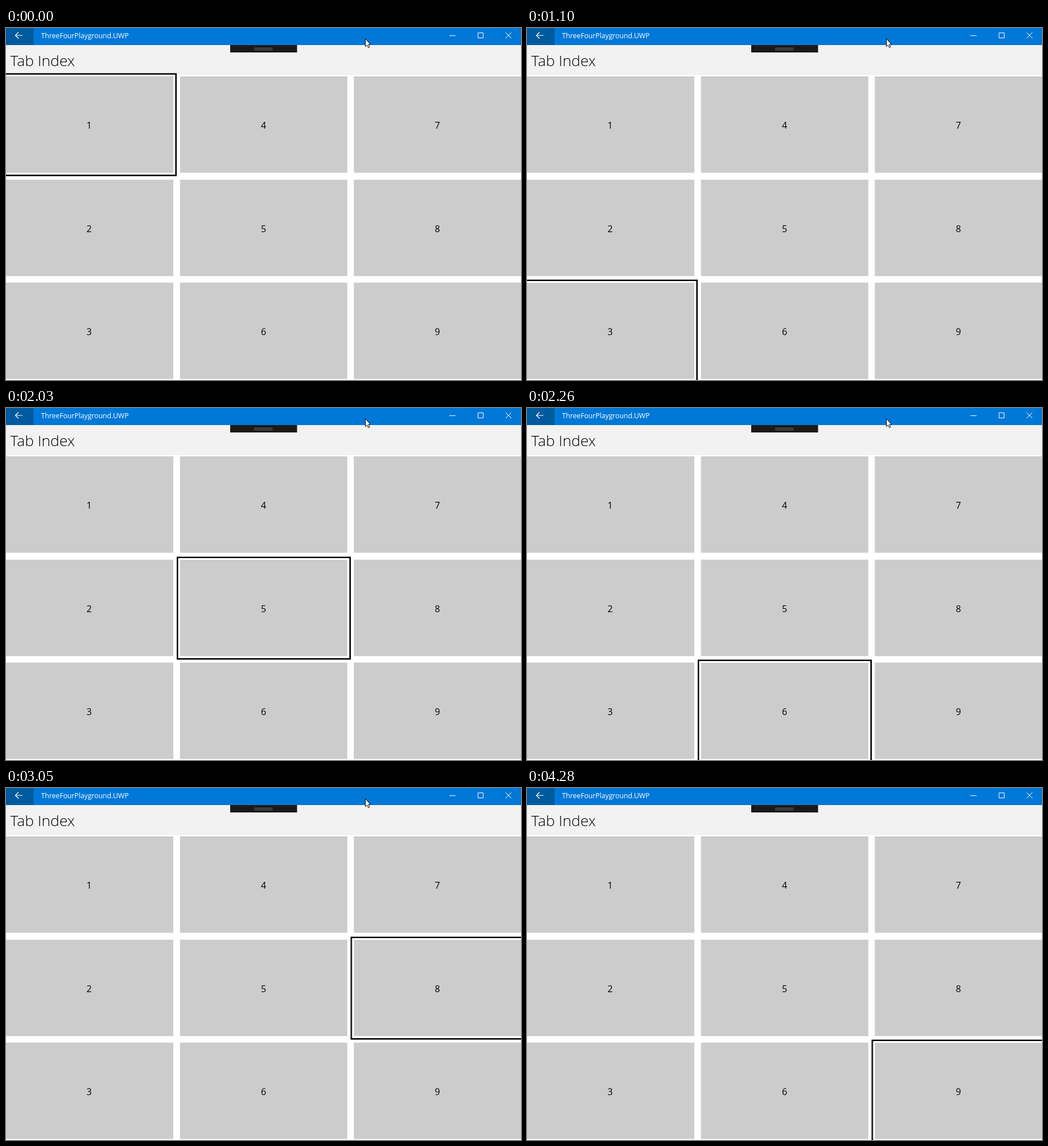
An HTML page that plays this animation: 905 by 619 pixels, repeating every 5.67 s.

```html
<!DOCTYPE html>
<html lang="en">
<head>
<meta charset="utf-8">
<title>Tab Index</title>
<style>
  html, body { margin: 0; width: 100%; height: 100%; overflow: hidden; background: #fff; }
  svg { display: block; width: 905px; height: 619px; }
  text { font-family: "Open Sans", "Noto Sans", sans-serif; }
  .app { font-size: 12.3px; letter-spacing: -.05px; fill: #fff; }
  .title { font-size: 26.4px; font-weight: 300; fill: #000; }
  .num { font-size: 16px; text-anchor: middle; fill: #000; }
  .icon { fill: none; stroke: #fff; }

  .focus { animation: focus 5670ms step-end infinite; }
  .pointer { animation: pointer 5670ms step-end infinite; }

  @keyframes focus {
    0%       { transform: translate(-306px, 0); }
    8.1129%  { transform: translate(-306px, 182px); }
    19.4004% { transform: translate(-306px, 363px); }
    28.9242% { transform: translate(0, 0); }
    35.8025% { transform: translate(0, 182px); }
    39.8589% { transform: translate(0, 363px); }
    45.3263% { transform: translate(305.5px, 0); }
    53.7919% { transform: translate(305.5px, 182px); }
    64.1975% { transform: translate(305.5px, 363px); }
  }
  @keyframes pointer {
    0% { visibility: visible; }
    75.485% { visibility: hidden; }
  }
</style>
</head>
<body>
<svg viewBox="0 0 905 619">
  <rect width="905" height="83" fill="#f2f2f2"/>
  <rect width="905" height="30" fill="#0078d7"/>
  <rect width="48.5" height="30" fill="#005a9e"/>
  <path class="icon" stroke-width="1.2" d="M29 13H16.5M22 7.5L16.5 13L22 18.5"/>
  <text class="app" x="61.5" y="18">ThreeFourPlayground.UWP</text>
  <path class="icon" d="M779 13.5H790M829.5 8.5H838.5V17.5H829.5ZM878 8L888 18M888 8L878 18"/>
  <text class="title" x="7.5" y="67">Tab Index</text>

  <g id="cells"></g>

  <g class="focus" fill="none">
    <path stroke="#fff" stroke-width="3" d="M304 83.5H601.5V256.5H304Z"/>
    <path stroke="#bbb" d="M303 258H603V82"/>
    <rect x="301.25" y="80.75" width="303.5" height="178.5" stroke="#000" stroke-width="2.5"/>
  </g>
  <path class="focus-end" fill="#111"/>

  <rect x="394" y="30" width="117.5" height="13" fill="#1a1a1a"/>
  <path stroke="#777" d="M436 35.5H468.5M436 38.5H468.5"/>
  <path class="pointer" fill="#fff" stroke="#000" d="M631.5 18.8V32.6L634.5 29.8L636.8 34.5L639 33.5L636.8 29H640.6Z"/>
</svg>
<script>
  const xs = [0, 305.75, 611.25], ys = [85, 266.7, 447.7];
  const mids = [146, 452.5, 758];
  let cells = '';
  xs.forEach((x, c) => ys.forEach((y, r) => {
    cells += `<rect x="${x}" y="${y}" width="294" height="169.6" fill="#ccc"/>` +
      `<text class="num" x="${mids[c]}" y="${Math.round(y) + 92}">${c * 3 + r + 1}</text>`;
  }));
  document.getElementById('cells').innerHTML = cells;
</script>
</body>
</html>
```
